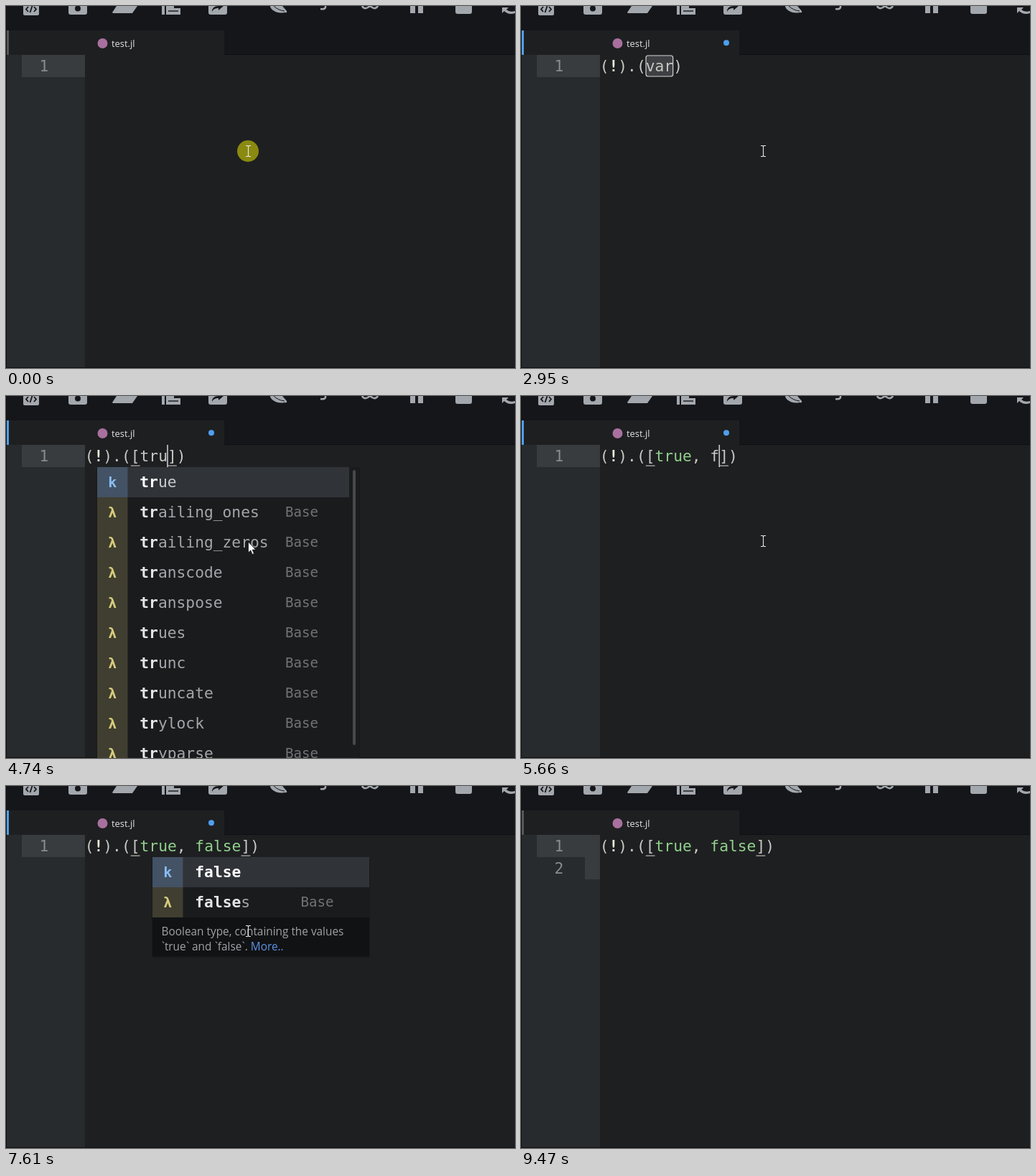
An HTML page for the animation above (9.55 s loop, 709 px wide and 504 px high).

```html
<!DOCTYPE html>
<html lang="en">
<head>
<meta charset="utf-8">
<title>Editor autocompletion</title>
<style>
html, body { margin: 0; width: 100%; height: 100%; overflow: hidden; background: #1e1f21; }
svg { display: block; }
text { white-space: pre; }
.code { font: 21.28px "DejaVu Sans Mono", monospace; }
.label { font: 19.1px "DejaVu Sans Mono", monospace; }
.icon { font: bold 20px "DejaVu Sans Mono", monospace; text-anchor: middle; }
.doc { font: 15.37px "Open Sans", sans-serif; fill: #a0a2a6; }
.tick { letter-spacing: -2.5px; }
.tab { font: 12.9px "Open Sans", sans-serif; fill: #e2e3e5; }
</style>
</head>
<body>
<svg id="stage" width="709" height="504" viewBox="0 0 709 504">
  <rect width="709" height="504" fill="#1e1f21"/>
  <rect width="709" height="68" fill="#15161a"/>
  <g id="tools" fill="#a3a8ae" stroke="#15161a" stroke-width="0">
    <path d="M24 0H46V11Q46 13 44 13H26Q24 13 24 11Z"/>
    <path d="M31 1L28 4.500L31 8M39 1L42 4.500L39 8M36.500 0L33.500 9" fill="none" stroke-width="1.800"/>
    <path d="M87 0H113V9Q113 12 110 12H90Q87 12 87 9Z"/>
    <circle cx="100" cy="3.500" r="4" fill="#15161a"/>
    <path d="M148 9L154 0H183L176 10H149Z"/>
    <path d="M150 0V4L153 0Z" fill="#15161a"/>
    <path d="M217 0H221V12H217ZM223 0H234V3H243V12H223Z"/>
    <path d="M226 7H240" stroke-width="1.400"/>
    <path d="M282 0H308V9Q308 12 305 12H285Q282 12 282 9Z"/>
    <path d="M287 8Q289 3 296 3V6L303 0H296Q287 0 287 8Z" fill="#15161a"/>
    <path d="M368 0H385L391 7Q392 10 388 9Q379 11 372 6Q368 3 368 0Z"/>
    <path d="M373 0Q379 6 388 7" fill="none" stroke-width="1"/>
    <path d="M445 0V2Q444 5 438 4" fill="none" stroke="#a3a8ae" stroke-width="2.500"/>
    <path d="M496 0Q499 5 504 2L507 0L510 2Q515 5 518 0" fill="none" stroke="#a3a8ae" stroke-width="2.600"/>
    <path d="M563 0H570V10H563ZM574 0H581V10H574Z"/>
    <path d="M626 0H649V8Q649 11 646 11H629Q626 11 626 8Z"/>
    <path d="M691 2V10L694 7Q700 13 709 10V7Q701 9 697 5L700 2Z"/>
  </g>
  <rect x="1" y="34" width="303" height="34" fill="#1e1f21"/>
  <path d="M304 67.500H709" stroke="#0e0f11"/>
  <circle cx="134.500" cy="52" r="7" fill="#a8709f"/>
  <text class="tab" x="147" y="57">test.jl</text>
  <rect x="1" y="68" width="109" height="435" fill="#272b2e"/>
  <rect x="22" y="68" width="88" height="31" fill="#383c3f"/>
  <text class="code" x="46.500" y="91" fill="#888b8d">1</text>
  <path d="M.5 0V504M0 503.500H709" stroke="#0d0e10" fill="none"/>
  <g id="live"></g>
</svg>
<script>
const LOOP = 9550, LEFT = 109.7, CH = 12.81, TOP = 99, ROW = 42;
const live = document.getElementById('live');

const kinds = {
  'λ': ['#3f3e30', '#d6cc7c'],
  '@': ['#2b3a30', '#7cc685'],
  'k': ['#435264', '#8abcf3'],
  '→': ['#31443a', '#84cf92']
};
const boolDoc = ['Boolean type, containing the values `true` and `false`.'];
const boolDocWrapped = ['Boolean type, containing the values', '`true` and `false`.'];
const base = s => s.split(' ').map(n => `λ${n}|Base`);

// Completion lists; label is the offset of the right column
const popups = {
  not: { x: 51, w: 302, label: 206.5, key: '!', rows: ['→!|', ...base('! != !==')], docH: 75,
    doc: ['Boolean not. Implements three-', 'valued logic, returning missing if', 'x is missing.'] },
  t: { x: 127, w: 439, label: 314, key: 't', bar: 383,
    rows: [...base('take! tan tand tanh task_local_storage tempdir tempname'),
      'λtest_colorscheme|OhMyREPL', '@text"|Base', 'λtextwidth|Base'] },
  tr: { x: 127, w: 365, label: 262, key: 'tr', bar: 383,
    rows: ['ktrue|', ...base('trailing_ones trailing_zeros transcode transpose trues trunc truncate trylock tryparse')] },
  tru: { x: 127, w: 302, label: 206.5, key: 'tru', rows: ['ktrue|', ...base('trues trunc truncate')],
    docH: 54, doc: boolDocWrapped },
  f: { x: 204, w: 600, label: 336, key: 'f',
    rows: [...base('factorial falses fd fdio fetch fieldcount fieldname'),
      '→function doc example|Documented Functions', ...base('fieldoffset filesize')] },
  fa: { x: 204, w: 600, label: 336, key: 'fa', docH: 41, doc: boolDoc,
    rows: ['kfalse|', ...base('falses factorial'), '→function doc example|Documented Functions'] },
  fal: { x: 204, w: 600, label: 336, key: 'fal', docH: 41, doc: boolDoc,
    rows: ['kfalse|', 'λfalses|Base', '→function doc example|Documented Functions'] },
  fals: { x: 204, w: 302, label: 206.5, key: 'fals', rows: ['kfalse|', 'λfalses|Base'],
    docH: 54, doc: boolDocWrapped }
};
popups.false = { ...popups.fals, key: 'false' };

// Time, text, caret column, popup, selected columns
const B = '(!).([';
const steps = [
  [0, '', 0],
  [1090, '!', 1, 'not'],
  [1470, '(!).(var)', 2, '', [1, 2]],
  [2570, '(!).(var)', 2],
  [2630, '(!).(var)', 8, '', [5, 8]],
  [4040, B + 'var])', 9, '', [6, 9]],
  [4350, B + 't])', 7],
  [4420, B + 't])', 7, 't'],
  [4510, B + 'tr])', 8, 't'],
  [4610, B + 'tr])', 8, 'tr'],
  [4720, B + 'tru])', 9, 'tr'],
  [4850, B + 'tru])', 9, 'tru'],
  [5050, B + 'true])', 10],
  [5360, B + 'true,])', 11],
  [5500, B + 'true, ])', 12],
  [5660, B + 'true, f])', 13],
  [5740, B + 'true, f])', 13, 'f'],
  [5960, B + 'true, fa])', 14, 'fa'],
  [6210, B + 'true, fal])', 15, 'fal'],
  [6370, B + 'true, fals])', 16, 'fals'],
  [6520, B + 'true, false])', 17, 'false'],
  [8080, B + 'true, false])', 17]
];
const caretOff = [[0, 90], [700, 1090], [1790, 2170], [2950, 3350], [3720, 4040],
  [6840, 7220], [7610, 7990], [8690, 9070], [9450, LOOP]];

const within = (t, a, b) => t >= a && t < b;
const esc = s => s.replace(/[&<>]/g, c => `&#${c.charCodeAt(0)};`);
const rect = (x, y, w, h, fill, more = '') =>
  `<rect x="${x}" y="${y}" width="${w}" height="${h}" fill="${fill}" ${more}/>`;
const text = (cls, x, y, fill, body) => `<text class="${cls}" x="${x}" y="${y}" fill="${fill}">${body}</text>`;
const span = (fill, s, more = '') => `<tspan fill="${fill}" ${more}>${s}</tspan>`;

const paint = s => s.replace(/\b(true|false)\b|!/g,
  m => m === '!' ? span('#f1ecd8', m, 'font-weight="bold"') : span('#91d18c', m));

// Emphasise the letters that match the typed key in order
function match(name, key, bright) {
  let k = 0;
  return [...name].map(c => c === key[k]
    ? (k++, span(bright, esc(c), 'font-weight="bold"')) : esc(c)).join('');
}

function drawRow(p, row, i) {
  const [name, label] = row.slice(1).split('|'), kind = row[0], [bg, fg] = kinds[kind];
  const y = TOP + i * ROW, mid = p.x + 21.3, first = i === 0;
  let s = '';
  if (first) s += rect(p.x, y, p.w - (p.bar ? 14 : 0), ROW, '#303337');
  s += rect(p.x, y, 42.5, ROW, bg);
  if (first && kind !== 'k') s += rect(p.x, y, 42.5, ROW, '#fff', 'opacity=".11"');
  s += kind === '→'
    ? `<path d="M${mid - 11} ${y + 19}h8v-5l8 6.500l-8 6.500v-5h-8zM${mid + 7.5} ${y + 14}h3v13h-3z" fill="${fg}"/>`
    : text('icon', mid, y + 27.5, fg, kind);
  s += text('code', p.x + 59.3, y + 28, first ? '#c9cbce' : '#a4a6ab', match(name, p.key, first ? '#fff' : '#e4e5e7'));
  return s + text('label', p.x + p.label, y + 27, first ? '#8c8e91' : '#707275', label);
}

function drawPopup(p) {
  const h = p.rows.length * ROW, full = h + (p.doc ? p.docH : 0);
  let s = rect(p.x - 1, TOP, p.w + 2, full + 2, '#000', 'opacity=".2" rx="3"');
  s += rect(p.x, TOP, p.w, full, '#1a1b1d', 'rx="2"');
  s += p.rows.map((r, i) => drawRow(p, r, i)).join('');
  if (p.bar) s += rect(p.x + p.w - 9, TOP + 4, 4, p.bar, '#46484b', 'rx="2"');
  if (p.doc) {
    s += rect(p.x, TOP + h, p.w, p.docH, '#111214');
    p.doc.forEach((line, i) => {
      const body = line.replace(/`/g, '<tspan class="tick" dx="-2">`</tspan>');
      const more = i === p.doc.length - 1 ? ' ' + span('#5c92e6', 'More..') : '';
      s += `<text class="doc" x="${p.x + 12.5}" y="${TOP + h + 24.5 + i * 21}">${body}${more}</text>`;
    });
  }
  return s;
}

// Innermost bracket pair around the caret
function underline(str, caret) {
  let a = -1, b = -1, depth = 0;
  for (let i = caret - 1; i >= 0 && a < 0; i--) {
    if (')]'.includes(str[i])) depth++;
    else if ('(['.includes(str[i]) && depth-- === 0) a = i;
  }
  depth = 0;
  for (let i = caret; i < str.length && b < 0; i++) {
    if ('(['.includes(str[i])) depth++;
    else if (')]'.includes(str[i]) && depth-- === 0) b = i;
  }
  return a < 0 || b < 0 ? '' : [a, b].map(c => rect(LEFT + c * CH, 96.5, CH, 1.2, '#b9b9b6')).join('');
}

function drawMouse(t, popup) {
  let x = 337.5, y = 202, s = '';
  if (t < 310) s += `<circle cx="337" cy="202" r="15" fill="#8a8a10" opacity="${t < 200 ? 1 : .5}"/>`;
  if (popup && popup.rows.length > 2)
    return `<path d="M337.500 203v15l3.300-3.100l2.300 5.600l2.400-1l-2.300-5.400h4.600z" fill="#fff" stroke="#111" stroke-width=".8"/>`;
  const u = Math.min(1, Math.max(0, (t - 8760) / 640)), e = u * u * (3 - 2 * u);
  x += 325 * e;
  y += 325 * e;
  return s + `<path d="M${x - 3.5} ${y - 7.5}h2.500l1 1l1-1h2.500M${x} ${y - 6.5}v13M${x - 3.5} ${y + 7.5}h2.500l1-1l1 1h2.500" fill="none" stroke="#e8e8e8" stroke-width="1.100"/>`;
}

function picture(t) {
  const [, str, caret, key, sel] = steps.findLast(s => t >= s[0]);
  const popup = popups[key];
  let s = rect(1, 34, 3, 34, within(t, 90, 9440) ? '#529fe8' : '#55585b');
  if (within(t, 1410, 8190)) s += '<circle cx="286" cy="51.300" r="4" fill="#4f9fee"/>';
  if (t >= 8190) s += rect(89, 99, 21, 31, '#383c3f') + text('code', 46.5, 122, '#888b8d', '2');
  if (sel) s += rect(LEFT + sel[0] * CH + .3, 69, (sel[1] - sel[0]) * CH - .8, 29, '#3e4043',
    'stroke="#d2d3d4" stroke-width="1.200" rx="3"');
  else s += underline(str, caret);
  s += text('code', LEFT, 91, '#c9c8c4', paint(str));
  if (!caretOff.some(([a, b]) => within(t, a, b))) s += rect(Math.max(110, LEFT + caret * CH - .8), 68, 1.6, 31, '#c4c8ce');
  if (popup) s += drawPopup(popup);
  return s + drawMouse(t, popup);
}

let shown = '';
function tick(now) {
  const next = picture(now % LOOP);
  if (next !== shown) live.innerHTML = shown = next;
  requestAnimationFrame(tick);
}
tick(0);
</script>
</body>
</html>
```
